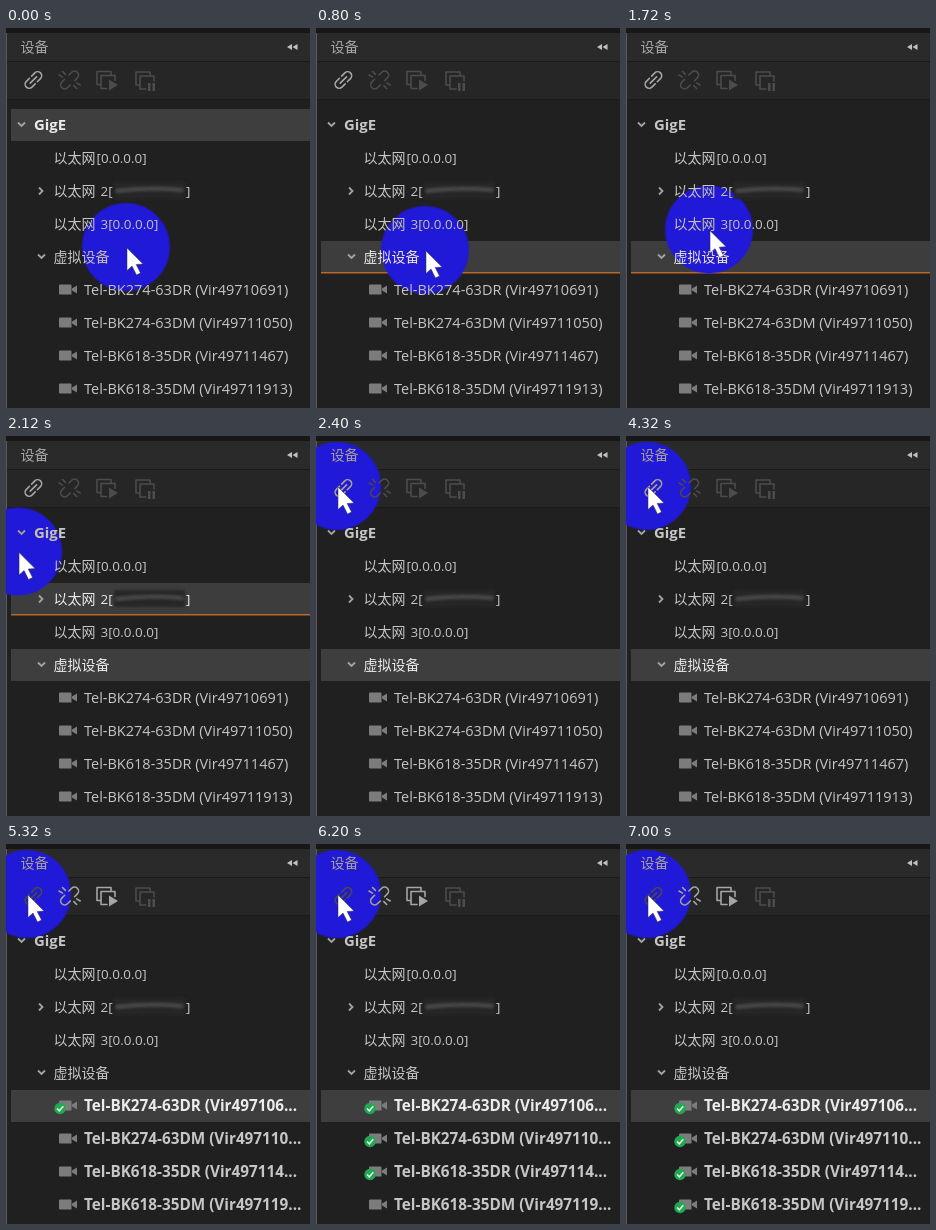
These frames come from a looping animation (304x380 px, 7080 ms). An HTML page:

```html
<!DOCTYPE html>
<html lang="zh-CN">
<head>
<meta charset="utf-8">
<style>
html, body { margin: 0; width: 100%; height: 100%; overflow: hidden; background: #202020; }
svg { display: block; width: 304px; height: 380px; isolation: isolate; }
text { font-family: "Open Sans", "Noto Sans CJK SC", "Noto Sans CJK", sans-serif; fill: #c6c6c6; white-space: pre; }
.bold { font-weight: 700; }
.lit { fill: #ececec; }
.icon { fill: none; stroke: #4c4c4c; stroke-width: 1.6; stroke-linecap: round; stroke-linejoin: round; }
.icon .solid { fill: #4c4c4c; stroke: none; }
.icon.on { stroke: #a6a6a6; }
.icon.on .solid { fill: #a6a6a6; }
.chevron { fill: none; stroke: #a2a2a2; stroke-width: 1.8; }
.spot { fill: #2119ff; stroke: #2119ff; stroke-width: 2; stroke-opacity: .45; }
.tint { fill: #fffad8; mix-blend-mode: multiply; }
</style>
</head>
<body>
<svg viewBox="0 0 304 380">
  <defs>
    <filter id="soft" x="-20%" y="-60%" width="140%" height="220%"><feGaussianBlur stdDeviation="1.5"/></filter>
    <path id="stack" d="M4 13H0V0h14v3M4 4h14v5M4 4v13h6"/>
  </defs>
  <rect width="304" height="380" fill="#202020"/>
  <rect width="304" height="5" fill="#171717"/>
  <rect y="5" width="304" height="28" fill="#2a2a2a"/>
  <rect y="34" width="304" height="37" fill="#262626"/>
  <path d="M0 33.500H304M0 71.500H304" stroke="#1b1b1b"/>
  <path d="M.5 5V380" stroke="#5a5a5a"/>

  <rect id="selection" x="5" width="299" height="32" fill="#3e3e3e"/>
  <g id="hover">
    <rect x="5" width="299" height="32" fill="#3d3d3d"/>
    <rect x="5" y="31" width="299" height="1.500" fill="#b8692a"/>
  </g>
  <circle class="spot follow" r="43.500"/>

  <text x="14.500" y="24" font-size="14" style="fill:#a8a8a8">设备</text>
  <path d="M286 16v6l-5-3zM291.500 16v6l-5-3z" fill="#c0c0c0"/>

  <g class="icon" id="link" transform="translate(27.400 52) rotate(-45)">
    <path d="M-1.500 -4H-6a4 4 0 0 0 0 8h4.500M1.500 -4H6a4 4 0 0 1 0 8H1.500M-4.500 0h9"/>
  </g>
  <g class="icon" id="unlink" transform="translate(63.600 52) rotate(-45)">
    <path d="M-3 -4H-7a4 4 0 0 0 0 8h4M3 -4H7a4 4 0 0 1 0 8H3M-3 -7l-1 -4M1 -7v-4M3 7l1 4M-1 7v4"/>
  </g>
  <g class="icon" id="play" transform="translate(91 43.500)">
    <use href="#stack"/><path class="solid" d="M12 8l9 5.500-9 5.500z"/>
  </g>
  <g class="icon" transform="translate(130 44)">
    <use href="#stack"/><path class="solid" d="M12 11h2.500v8H12zM16.500 11H19v8h-2.500z"/>
  </g>

  <path class="chevron" d="M12 94.500l3.500 3.500 3.500-3.500M33 159.500l3.500 3.500-3.500 3.500M32 226.500l3.500 3.500 3.500-3.500"/>
  <g filter="url(#soft)">
    <rect x="108" y="154" width="71" height="17" fill="#272727"/>
    <path d="M110 163q34-4 67 -1" fill="none" stroke="#505050" stroke-width="3"/>
  </g>
  <g id="labels"></g>
  <g id="devices"></g>
  <circle class="tint follow" r="44"/>
  <g class="follow">
    <path transform="translate(1 1)" d="M0 0V22.500L5 18l4.500 9 4-2-4.300-8.500L16 16z" fill="#fff" stroke="#333" stroke-width=".5"/>
  </g>
</svg>
<script>
const LOOP = 7080;
const SELECT_GROUP = 400, CONNECT = 5120;
const CHECK_TIMES = [5120, 5760, 6200, 6640];
const HOVER_LAG = 130;
const GROUP_ROW = 4, DEVICE_ROW = 5;
const rowCenter = row => 97 + 33 * row;
const $ = id => document.getElementById(id);

function make(parent, tag, attributes, content = "") {
  const node = document.createElementNS("http://www.w3.org/2000/svg", tag);
  for (const key in attributes) node.setAttribute(key, attributes[key]);
  node.textContent = content;
  return parent.appendChild(node);
}

const label = (row, x, size, content, style = "") =>
  make($("labels"), "text", { x, y: rowCenter(row) + 5, "font-size": size, class: style }, content);

const rowLabels = [[label(0, 28, 14.9, "GigE", "bold")], [], [], [], [label(GROUP_ROW, 47.5, 14, "虚拟设备")]];
const adapters = [[90.5, "[0.0.0.0]"], [94.5, "2["], [94.5, "3[0.0.0.0]"]];
adapters.forEach(([x, suffix], i) => {
  rowLabels[i + 1] = [label(i + 1, 47.5, 14, "以太网"), label(i + 1, x, 13.4, suffix)];
});
rowLabels[2].push(label(2, 180, 13.4, "]"));

const devices = [
  ["Tel-BK274-63DR", "49710691"],
  ["Tel-BK274-63DM", "49711050"],
  ["Tel-BK618-35DR", "49711467"],
  ["Tel-BK618-35DM", "49711913"]
].map(([model, serial], i) => {
  const y = rowCenter(DEVICE_ROW + i);
  const group = make($("devices"), "g", { transform: `translate(0 ${y})` });
  make(group, "path", { d: "M54 -5.500h10.500a1 1 0 0 1 1 1v9H54a1 1 0 0 1-1-1v-8a1 1 0 0 1 1-1zM66 -1.500l5-3v8l-5-3z", fill: "#7c7c7c" });
  const plain = make(group, "text", { x: 78, y: 5, "font-size": 14.5 }, `${model} (Vir${serial})`);
  const bold = make(group, "text", { x: 78, y: 5, "font-size": 15.3, class: "bold" }, `${model} (Vir${serial.slice(0, 6)}...`);
  const check = make(group, "g", {});
  make(check, "circle", { cx: 54, cy: 2.5, r: 5.7, fill: "#20a852" });
  make(check, "path", { d: "M51 2.500l2.300 2.300 4-4.500", fill: "none", stroke: "#e8f6ec", "stroke-width": 1.5 });
  return { plain, bold, check };
});

// time, x, y
const path = [
  [0, 120, 219], [120, 120, 219], [600, 109, 222], [1400, 109, 222],
  [1960, 30, 160], [2120, 12, 116], [2400, 21, 50], [LOOP, 21, 50]
];

function pointerAt(t) {
  const next = Math.max(1, path.findIndex(key => key[0] > t));
  const [t0, x0, y0] = path[next - 1], [t1, x1, y1] = path[next];
  let p = (t - t0) / (t1 - t0);
  if (t0 === 1400) p *= p;
  if (t1 === 2400) p = 1 - (1 - p) ** 2;
  return [x0 + (x1 - x0) * p, y0 + (y1 - y0) * p];
}

const show = (node, visible) => node.setAttribute("visibility", visible ? "visible" : "hidden");
const moveToRow = (node, row) => node.setAttribute("transform", `translate(0 ${rowCenter(row) - 16})`);
const followers = document.querySelectorAll(".follow");

function draw(t) {
  const [x, y] = pointerAt(t);
  followers.forEach(node => node.setAttribute("transform", `translate(${x} ${y})`));

  const connected = t >= CONNECT;
  const selected = t < SELECT_GROUP ? 0 : connected ? DEVICE_ROW : GROUP_ROW;
  moveToRow($("selection"), selected);

  const hovered = Math.floor((pointerAt(Math.max(0, t - HOVER_LAG))[1] - 81) / 33);
  const hovering = t > 200 && hovered >= 0;
  show($("hover"), hovering);
  moveToRow($("hover"), hovered);
  rowLabels.forEach((parts, row) => parts.forEach(part =>
    part.classList.toggle("lit", row === selected || (hovering && row === hovered))));

  $("link").classList.toggle("on", !connected);
  $("unlink").classList.toggle("on", connected);
  $("play").classList.toggle("on", connected);
  devices.forEach(({ plain, bold, check }, i) => {
    show(plain, !connected);
    show(bold, connected);
    bold.classList.toggle("lit", i === 0);
    show(check, t >= CHECK_TIMES[i]);
  });
}

const start = performance.now();
function tick() {
  draw((performance.now() - start) % LOOP);
  requestAnimationFrame(tick);
}
tick();
</script>
</body>
</html>
```
